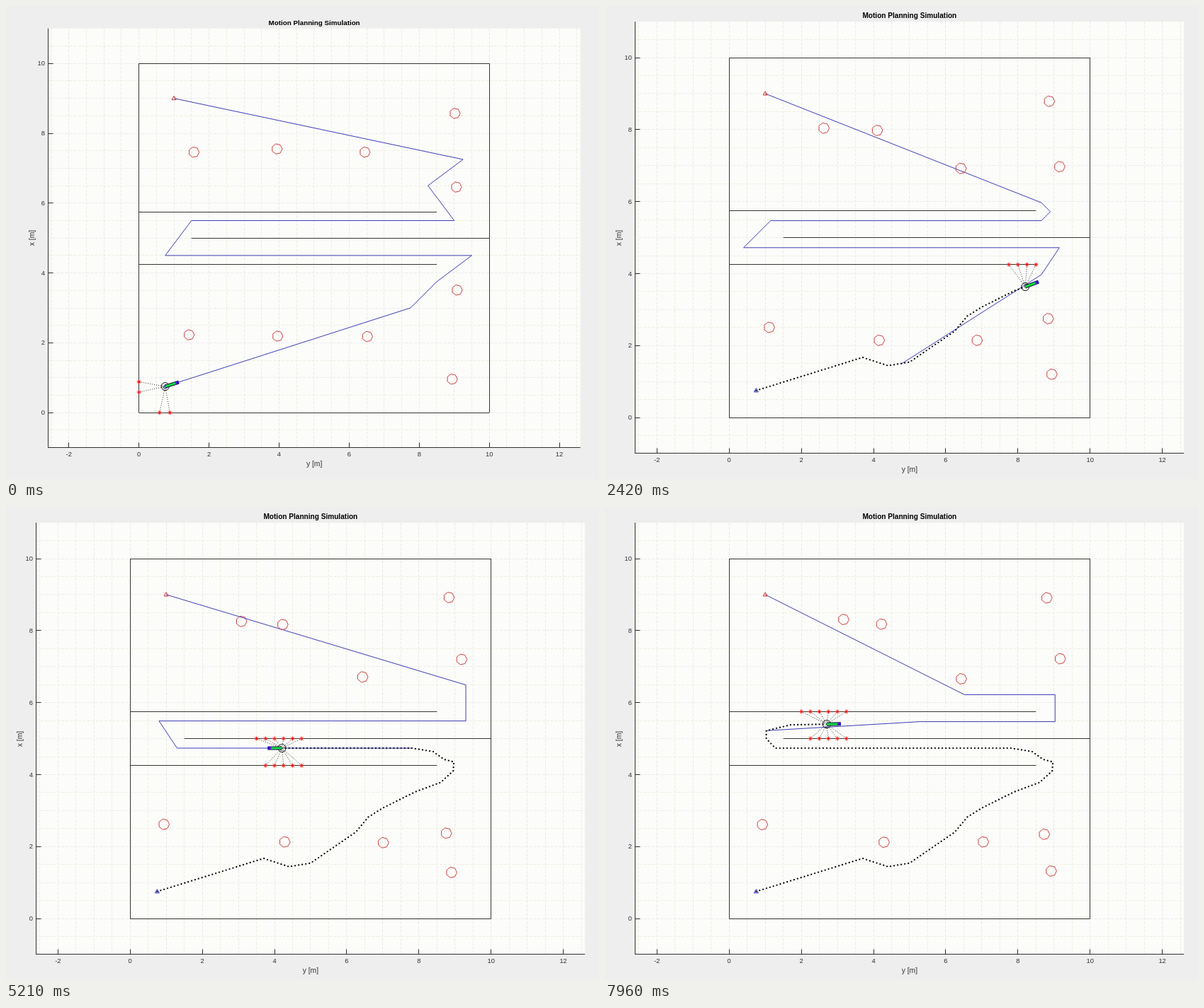
An HTML page with a canvas that plays this animation: 837 by 669 pixels, repeating every 8 s.

```html
<!DOCTYPE html>
<html lang="en">
<head>
<meta charset="utf-8">
<title>Motion Planning Simulation</title>
<style>
  html, body { margin: 0; width: 100%; height: 100%; overflow: hidden; background: #eeeeee; }
  canvas { display: block; width: 837px; height: 669px; }
</style>
</head>
<body>
<canvas id="stage" width="837" height="669"></canvas>
<script>
const ctx = document.getElementById('stage').getContext('2d');
const LOOP = 8000, FPS = 24, LAST = 191, STEP = 0.1, RANGE = 0.8;
const FONT = '"Liberation Sans", Arial, sans-serif';

// The figure grows once after the first drawing
const small = { x0: 187.65, y0: 575.2, ux: 49.45, uy: 49.4 };
const large = { x0: 175.2, y0: 582.05, ux: 50.95, uy: 50.9 };
let view = small;
const X = x => view.x0 + x * view.ux;
const Y = y => view.y0 - y * view.uy;
const snap = v => Math.floor(v) + 0.5;
const lerp = (a, b, u) => a + (b - a) * u;

// Bends of the travelled route in metres
const route = [
  [.75, .75], [3.7, 1.67], [4.4, 1.44], [5, 1.54], [6.25, 2.4], [6.6, 2.82], [7, 3.07], [7.9, 3.52],
  [8.6, 3.78], [8.95, 4.1], [8.97, 4.35], [8.7, 4.42], [8.39, 4.64], [7.8, 4.735], [1.28, 4.735],
  [1.03, 5], [1.03, 5.22], [1.7, 5.38], [2.7, 5.4]
];
const lengths = [0];
for (let i = 1; i < route.length; i++)
  lengths[i] = lengths[i - 1] + Math.hypot(route[i][0] - route[i - 1][0], route[i][1] - route[i - 1][1]);
const total = lengths[lengths.length - 1];

function pointAt(s) {
  let i = 1;
  while (i < route.length - 1 && lengths[i] < s) i++;
  const u = (s - lengths[i - 1]) / (lengths[i] - lengths[i - 1]);
  return [0, 1].map(k => lerp(route[i - 1][k], route[i][k], u));
}

// Steps taken so far: quick at first, then an almost even pace
function stepsAt(u) {
  const lead = 0.466 + 0.155 * Math.cos(4.9 * (u - 0.16));
  return Math.round(total * (u + lead * u * (1 - u)) / STEP);
}

// Planned paths, each with the distance at which it takes over
const plans = [
  [0, 'M.75 .75L7.75 3L8.5 3.75L9.5 4.5H.75L1.5 5.5H9L8.25 6.5L9.25 7.25L1 9'],
  [4.2, 'M4.77 1.49L8.65 3.97L9.15 4.72H.4L1.15 5.47H8.65L8.9 5.72L8.65 5.97L1 9'],
  [9.4, 'M8.9 4.36L7.77 4.75H.27L1.27 5.5H8.77L9.02 6.5L1 9'],
  [10.7, 'M7.8 4.735H1.3L.8 5.49H9.3V6.49L1 9'],
  [17.8, 'M1.02 5.22L5.28 5.47H9.03V6.22H6.52L1 9']
].map(([from, d]) => ({ from, path: new Path2D(d) }));

// Wandering obstacles: where each begins and where it drifts to
const obstacles = [
  [1.43, 2.23, .92, 2.61], [3.96, 2.19, 4.29, 2.12], [6.52, 2.18, 7.04, 2.13], [8.94, .96, 8.92, 1.32],
  [9.08, 3.51, 8.73, 2.34], [9.06, 6.46, 9.17, 7.22], [9.02, 8.57, 8.8, 8.91], [6.45, 7.46, 6.43, 6.66],
  [3.94, 7.55, 4.22, 8.18], [1.57, 7.46, 3.17, 8.31]
];

function noise(n) {
  const v = Math.sin(n * 127.1) * 43758.5453;
  return v - Math.floor(v) - 0.5;
}

function heptagon([x0, y0, x1, y1], id, tick) {
  const u = tick / LAST, ease = 1 - (1 - u) ** 3, shake = 0.06 * Math.sin(Math.PI * u);
  const x = lerp(x0, x1, ease) + shake * noise(tick * 20 + id * 2 + 1);
  const y = lerp(y0, y1, ease) + shake * noise(tick * 20 + id * 2 + 2);
  const corners = [...Array(7)].map((_, k) => {
    const a = k * 2 * Math.PI / 7;
    return [x + 0.15 * Math.cos(a), y + 0.15 * Math.sin(a)];
  });
  return { x, y, corners };
}

// Points on the walls that the range sensor can see
const inner = [[0, 8.5, 5.75], [1.5, 10, 5], [0, 8.5, 4.25]];
const wallPoints = [];
for (const [a, b, y] of inner)
  for (let x = a; x <= b; x += 0.25) wallPoints.push([x, y]);
for (let i = 0; i <= 34; i++) {
  const v = i * 10 / 34;
  wallPoints.push([v, 0], [v, 10], [0, v], [10, v]);
}

function stroke(points, color, width = 1, dash = [], closed = false) {
  ctx.beginPath();
  points.forEach(([x, y]) => ctx.lineTo(x, y));
  if (closed) ctx.closePath();
  ctx.strokeStyle = color;
  ctx.lineWidth = width;
  ctx.setLineDash(dash);
  ctx.stroke();
}
const hLine = (a, b, y, color, dash) => stroke([[a, snap(y)], [b, snap(y)]], color, 1, dash);
const vLine = (x, a, b, color, dash) => stroke([[snap(x), a], [snap(x), b]], color, 1, dash);
const toStage = points => points.map(([x, y]) => [X(x), Y(y)]);

function dot(x, y, radius) {
  ctx.beginPath();
  ctx.arc(X(x), Y(y), radius, 0, 2 * Math.PI);
}

function text(str, x, y, font, align = 'center') {
  ctx.font = `${font} ${FONT}`;
  ctx.textAlign = align;
  ctx.textBaseline = 'middle';
  ctx.fillText(str, x, y);
}

function drawAxes() {
  const left = snap(X(-2.6)), right = X(12.6), top = Y(11), bottom = snap(Y(-1));
  const middle = (left + right) / 2, ink = '#303030';
  ctx.fillStyle = '#eeeeee';
  ctx.fillRect(0, 0, 837, 669);
  ctx.fillStyle = '#fcfcfa';
  ctx.fillRect(left, top, right - left, bottom - top);
  for (let v = -2.5; v <= 12.5; v += 0.5) {
    vLine(X(v), top, bottom, v % 1 ? '#ededdf' : '#eaeae4', [4, 2]);
    if (v > -1 && v < 11) hLine(left, right, Y(v), v % 1 ? '#eeeee1' : '#ebebf1', [4, 2]);
  }
  vLine(left, top, bottom + 0.5, ink);
  hLine(left, right, bottom, ink);
  ctx.fillStyle = ink;
  for (let v = -2; v <= 12; v += 2) {
    vLine(X(v), bottom - 7, bottom, ink);
    text(v, X(v), bottom + 9.5, '9.4px');
    if (v >= 0 && v <= 10) {
      hLine(left, left + 7, Y(v), ink);
      text(v, left - 4.5, Y(v) + 0.5, '9.4px', 'right');
    }
  }
  text('y [m]', middle, bottom + 23.5, '10.3px');
  ctx.save();
  ctx.translate(left - 22.5, 328);
  ctx.rotate(-Math.PI / 2);
  text('x [m]', 0, 0, '10.3px');
  ctx.restore();
  ctx.fillStyle = '#000';
  text('Motion Planning Simulation', middle, top - 7.5, `bold ${view.ux / 5}px`.replace(/(\.\d)\d+/, '$1'));
}

function drawWalls() {
  const color = '#363632';
  for (const v of [0, 10]) {
    hLine(X(0), X(10), Y(v), color);
    vLine(X(v), Y(10), Y(0), color);
  }
  inner.forEach(([a, b, y]) => hLine(X(a), X(b), Y(y), color));
}

function drawPlan(path) {
  const scaled = new Path2D();
  scaled.addPath(path, new DOMMatrix([view.ux, 0, 0, -view.uy, view.x0, view.y0]));
  ctx.strokeStyle = '#3c3cb8';
  ctx.lineWidth = 1;
  ctx.setLineDash([]);
  ctx.stroke(scaled);
}

function triangle(x, y, color) {
  const px = X(x), py = Y(y);
  stroke([[px - 3, py + 2], [px + 3, py + 2], [px, py - 3.2]], color, 1, [], true);
}

function star([x, y]) {
  for (let k = 0; k < 4; k++) {
    const c = 3 * Math.cos(k * Math.PI / 4), s = 3 * Math.sin(k * Math.PI / 4);
    stroke([[x - c, y - s], [x + c, y + s]], '#f01414');
  }
}

function drawRobot(x, y, angle, side) {
  const ray = (a, from, to, color, width) => stroke(
    [from, to].map(r => [X(x) + r * Math.cos(a), Y(y) - r * Math.sin(a)]), color, width);
  dot(x, y, 5.5);
  ctx.strokeStyle = '#111';
  ctx.lineWidth = 1;
  ctx.setLineDash([]);
  ctx.stroke();
  if (side) ray(angle + side * Math.PI / 2, 0, 16.5, '#f01010', 3);
  ray(angle, 0, 20, '#101030', 5);
  ray(angle, 13, 20, '#1414e6', 4);
  if (!side) ray(angle, 14, 17, '#8a1c9a', 3);
  ray(angle, 0, 15, '#12e046', 3);
}

function draw(tick) {
  view = tick < 1 ? small : large;
  const steps = stepsAt(tick / LAST), s = steps * STEP;
  const [x, y] = pointAt(s), ahead = pointAt(s + STEP);
  const angle = Math.atan2(ahead[1] - y, ahead[0] - x);
  const seen = ([a, b]) => Math.hypot(a - x, b - y) <= RANGE;
  const shapes = obstacles.map((o, id) => heptagon(o, id, tick));

  drawAxes();
  drawWalls();
  drawPlan(plans.filter(p => p.from <= s).pop().path);
  shapes.forEach(o => stroke(toStage(o.corners), '#cc4040', 1, [], true));
  triangle(1, 9, '#d02828');
  triangle(.75, .75, '#2424c8');

  ctx.fillStyle = '#000';
  for (let i = 0; i <= steps; i++) {
    dot(...pointAt(i * STEP), 1.15);
    ctx.fill();
  }

  const hits = toStage([...wallPoints, ...shapes.flatMap(o => o.corners)].filter(seen));
  hits.forEach(h => stroke([[X(x), Y(y)], h], '#333', 1, [1, 2]));
  hits.forEach(star);

  const near = shapes.find(o => o.corners.some(seen));
  const cross = near ? Math.cos(angle) * (near.y - y) - Math.sin(angle) * (near.x - x) : 0;
  drawRobot(x, y, angle, -Math.sign(cross));
}

let shown = -1;
const start = performance.now();
function play(now) {
  const tick = Math.floor((Math.max(0, now - start) % LOOP) * FPS / 1000 + 0.02);
  if (tick !== shown) draw(shown = tick);
  requestAnimationFrame(play);
}
play(start);
</script>
</body>
</html>
```
